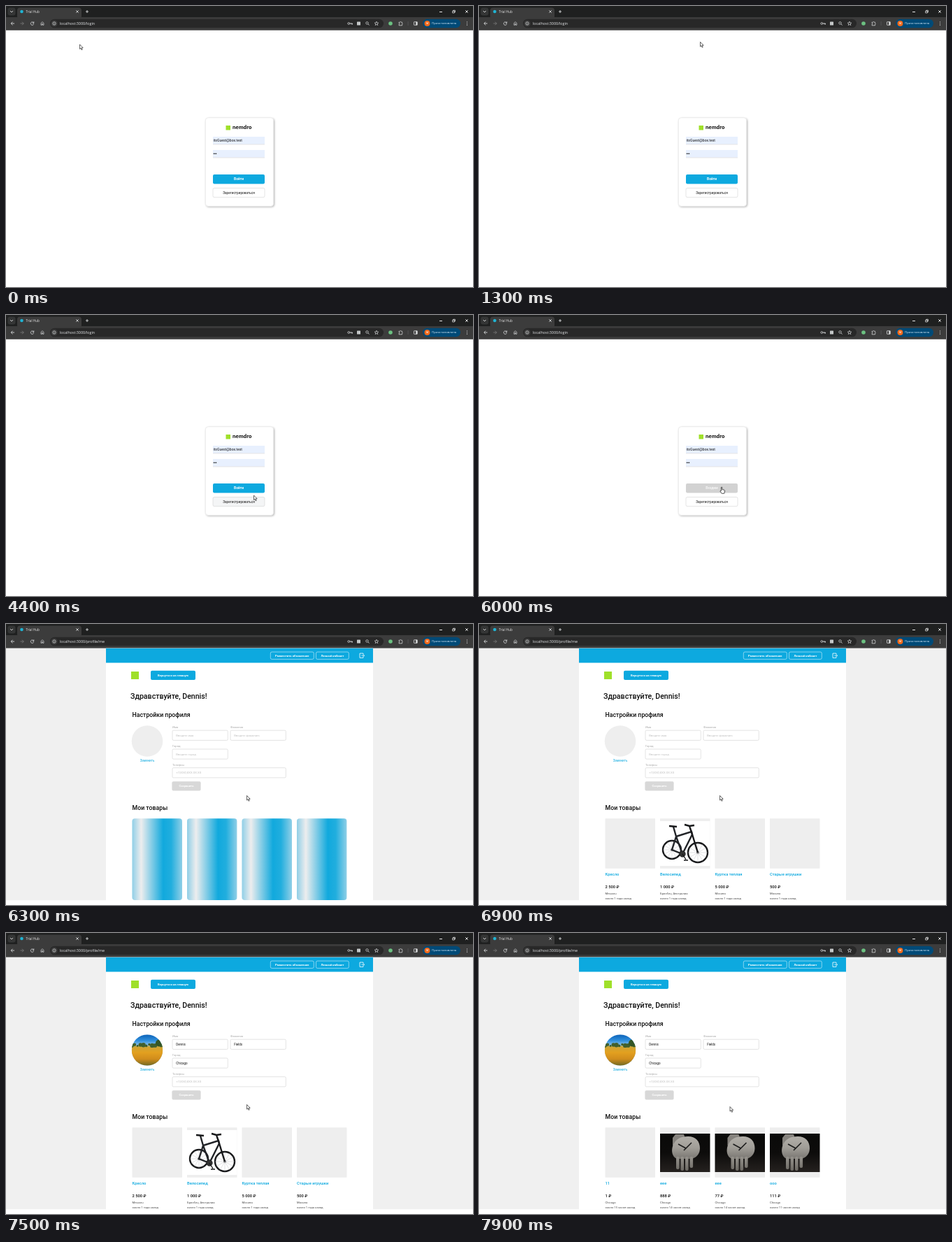
An HTML page with a canvas for the animation above (8000 ms loop, 668 px wide and 402 px high).

```html
<!DOCTYPE html>
<html lang="ru">
<head>
<meta charset="utf-8">
<style>
html, body { margin: 0; width: 100%; height: 100%; overflow: hidden; background: #fff; }
canvas { display: block; width: 668px; height: 402px; }
</style>
</head>
<body>
<canvas id="stage"></canvas>
<script>
const LOOP = 8000, W = 668, H = 402;
const BLUE = '#0da9df', GREY = '#eeeeee', MARK = '#9fe02a';
const ROBOTO = 'Roboto, sans-serif', SYSTEM = '"Open Sans", sans-serif';
const canvas = document.getElementById('stage');
const c = canvas.getContext('2d');
const dpr = window.devicePixelRatio || 1;
canvas.width = W * dpr;
canvas.height = H * dpr;

// Pointer path: time, x, y
const path = [
  [0, 105.5, 55], [100, 105.5, 55], [300, 177, 49.5], [500, 232.5, 57],
  [600, 232.5, 57], [900, 284, 64], [1100, 333, 56], [1200, 333, 56],
  [1300, 316.5, 51.5], [2000, 316.5, 51.5], [2400, 350, 90], [2800, 350, 90],
  [2900, 359, 62], [3300, 431, 143], [3500, 431, 143], [3800, 268.5, 106],
  [4000, 268.5, 106], [4400, 354.5, 258], [4500, 348, 254.5], [4600, 348, 254.5],
  [4700, 344.5, 245.5], [7700, 344.5, 245.5], [7900, 359, 248.5], [8000, 359, 248.5]
];

const market = [
  ['Кресло', '2 500 ₽', 'Мюнхен', '1 года'],
  ['Велосипед', '1 000 ₽', 'Брисбен, Австралия', '1 года', bike],
  ['Куртка теплая', '5 000 ₽', 'Москва', '1 года'],
  ['Старые игрушки', '500 ₽', 'Москва', '1 года']
];
const own = [
  ['11', '1 ₽', 'Chicago', '15 часов'],
  ['eee', '888 ₽', 'Chicago', '14 часов', hand],
  ['eee', '77 ₽', 'Chicago', '14 часов', hand],
  ['ooo', '111 ₽', 'Chicago', '11 часов', hand]
];

function rect(x, y, w, h, fill, r = 0, stroke, lw = 0.5) {
  c.beginPath();
  c.roundRect(x, y, w, h, r);
  if (fill) { c.fillStyle = fill; c.fill(); }
  if (stroke) { c.strokeStyle = stroke; c.lineWidth = lw; c.stroke(); }
}

function disc(x, y, r, fill, stroke, lw = 0.8) {
  c.beginPath();
  c.arc(x, y, r, 0, 7);
  if (fill) { c.fillStyle = fill; c.fill(); }
  if (stroke) { c.strokeStyle = stroke; c.lineWidth = lw; c.stroke(); }
}

function shape(d, x, y, fill, stroke, lw = 0.9) {
  const p = new Path2D(d);
  c.save();
  c.translate(x, y);
  if (fill) { c.fillStyle = fill; c.fill(p); }
  if (stroke) { c.strokeStyle = stroke; c.lineWidth = lw; c.stroke(p); }
  c.restore();
}

function fade(y0, y1, ...colors) {
  const g = c.createLinearGradient(0, y0, 0, y1);
  colors.forEach((color, i) => g.addColorStop(i / (colors.length - 1), color));
  return g;
}

function text(s, x, y, size, color, { align = 'left', weight = 400, font = ROBOTO } = {}) {
  c.font = `${weight} ${size}px ${font}`;
  c.textAlign = align;
  c.textBaseline = 'middle';
  c.fillStyle = color;
  c.fillText(s, x, y);
}

function button(label, x, y, w, h, fill, color, { border, size = 4.2, weight = 600 } = {}) {
  rect(x, y, w, h, fill, 2, border);
  text(label, x + w / 2, y + h / 2 + 0.2, size, color, { align: 'center', weight });
}

function browser(url) {
  const ink = '#d5d7d8';
  rect(0, 0, W, 16, '#1f2020');
  rect(2.5, 2.5, 11, 11, '#353636', 3);
  shape('M-2 -1L0 1L2 -1', 8, 8, null, ink);
  rect(16, 2.5, 92, 16, '#3c3c3c', 4);
  disc(22.5, 8, 2.3, '#20b4d4');
  text('Trial Hub', 28.5, 8.3, 4.6, '#e8e8e8', { font: SYSTEM });
  const cross = 'M-1.7 -1.7L1.7 1.7M1.7 -1.7L-1.7 1.7';
  shape(cross, 102, 8, null, ink);
  shape('M-2 0H2M0 -2V2', 116, 8, null, ink);
  shape('M-2 0H2', 622, 8.5, null, '#fff');
  shape('M-1.8 -.7H.9V1.9H-1.8ZM-.8 -.8V-1.8H1.9V.9H1', 640.5, 8, null, '#fff', 0.7);
  shape(cross, 659, 8, null, '#fff');

  rect(0, 16, W, 18.8, '#3c3c3c');
  rect(63, 18.7, 477, 12.6, '#282828', 6.3);
  shape('M2.5 0H-2.3M0 -2.3L-2.3 0L0 2.3', 9.5, 25, null, ink);
  shape('M-2.5 0H2.3M0 -2.3L2.3 0L0 2.3', 23, 25, null, '#777');
  shape('M1.8 -1.2A2.2 2.2 0 1 0 2.2 .5M2.3 -2.6V-.7H.4', 37.5, 25, null, ink);
  shape('M-2 -.6V2.3H-.6V.5H.6V2.3H2V-.6L0 -2.3Z', 52, 25, null, ink, 0.7);
  disc(69, 25, 4.6, '#3c3c3c');
  disc(69, 25, 2.2, null, ink, 0.7);
  shape('M0 -.3V1.3M0 -1.3V-.8', 69, 25, null, ink, 0.7);
  text(url, 77, 25.2, 5.35, '#e8eaed', { font: SYSTEM });
  disc(490.3, 25, 1.4, null, ink);
  shape('M1.4 0H5.2V1.5M3.8 0V1.4', 490.3, 25, null, ink);
  rect(502, 22.5, 5, 5, '#c4c7c8', 0.6);
  disc(516.5, 24.4, 1.7, null, ink);
  shape('M1.3 1.3L3.1 3.1', 516.5, 24.4, null, ink);
  shape('M0 -2.8L.8 -.9L2.8 -.8L1.2 .5L1.8 2.5L0 1.4L-1.8 2.5L-1.2 .5L-2.8 -.8L-.8 -.9Z', 530, 25, null, ink, 0.7);
  disc(550, 25, 2.8, '#6cc282');
  shape('M-2.4 -1.8H-.8A.9 .9 0 0 1 .9 -1.8H2.1V-.3A.9 .9 0 0 1 2.1 1.4V2.8H-2.4V1.2A.8 .8 0 0 0 -2.4 -.4Z', 564.5, 25, null, ink, 0.8);
  rect(574.8, 22, 0.5, 6, '#66696b');
  rect(583.5, 22.7, 4.8, 4.6, null, 0.4, ink, 0.8);
  rect(586.2, 22.7, 2.1, 4.6, ink);
  rect(596, 18.8, 54, 12.4, '#004a77', 6.2);
  disc(602.5, 25, 4, '#f2691b');
  text('М', 602.5, 25.2, 3.6, '#fff', { align: 'center' });
  text('Приостановлена', 609, 25.2, 4.3, '#d7ebfb', { font: SYSTEM });
  for (const y of [22.8, 25, 27.2]) disc(659.5, y, 0.6, ink);
}

function login(t) {
  c.save();
  c.shadowColor = 'rgba(0,0,0,.32)';
  c.shadowBlur = 3 * dpr;
  c.shadowOffsetX = c.shadowOffsetY = 1.2 * dpr;
  rect(285.3, 159.8, 97.4, 126.6, '#fff', 4);
  c.restore();
  rect(285.3, 159.8, 97.4, 126.6, '#fff', 4, '#d8d8d8');
  rect(314.5, 171, 6.5, 6.5, MARK);
  text('nemdro', 324, 174, 7.3, '#111', { weight: 700, font: 'Inter, sans-serif' });
  for (const y of [187, 206]) {
    rect(296, y, 74, 10.8, '#e8f0fe');
    rect(296, y + 10.8, 74, 0.5, '#c9c9cc');
  }
  text('itsGuest@box.test', 296.4, 192.7, 5.1, '#111');
  for (let i = 0; i < 3; i++) disc(297.4 + i * 1.6, 211.3, 0.7, '#111');

  const busy = t >= 4900;
  const fill = busy ? (t < 5000 ? '#a3c8d5' : '#d2d2d2') : BLUE;
  button(busy ? 'Входим' : 'Войти', 296, 241, 74, 13.6, fill, busy ? '#f4f4f4' : '#fff', { size: 4.9 });
  button('Зарегистрироваться', 296, 260.5, 74, 13.2, t === 4400 ? '#f4f5f6' : '#fff', '#111',
    { border: '#c8c8c8', size: 4.7, weight: 400 });
}

function field(label, hint, value, x, y, w) {
  text(label, x, y - 4.2, 4.2, '#a8a8a8');
  rect(x, y, w, 14.2, '#fff', 1.6, '#c6c6c6', 0.5);
  text(value || hint, x + 5.2, y + 7.3, value ? 4.5 : 4.2, value ? '#111' : '#c0c0c0');
}

function avatar(x, y, r) {
  c.save();
  c.beginPath();
  c.arc(x, y, r, 0, 7);
  c.clip();
  rect(x - r, y - r, 2 * r, 2 * r, fade(y - r, y - 5, '#0c62b8', '#2f8fdc', '#a4d0ee'));
  rect(x - r, y - 6, 2 * r, r + 6, fade(y - 6, y + r, '#c9a63a', '#e3a01f', '#d08c1c', '#6f6a24'));
  for (let i = 0; i < 12; i++) disc(x - r + i * 4.2, y - 7 - Math.sin(i * 2.3), 2.4 + Math.cos(i * 1.7), '#41602d');
  disc(x + 17, y - 10, 5, '#345626');
  c.restore();
}

function bike(x) {
  const black = '#17181a';
  rect(x, 282, 71.5, 64, '#fff');
  for (const [wx, wy, r] of [[x + 17, 323, 13], [x + 54, 327, 14]]) {
    disc(wx, wy, r, null, black, 2.4);
    disc(wx, wy, 1.8, '#333');
    c.beginPath();
    for (let i = 0; i < 12; i++) {
      const a = i * Math.PI / 6;
      c.moveTo(wx, wy);
      c.lineTo(wx + r * Math.cos(a), wy + r * Math.sin(a));
    }
    c.strokeStyle = '#b4b4b8';
    c.lineWidth = 0.4;
    c.stroke();
  }
  shape('M17 323L23 304L32 329ZM23 304L45 297L46 301L32 329M19 290L23 304', x, 0, null, '#222428', 2.4);
  shape('M42 289L46 301L54 327M35 287L42 289L49 288', x, 0, null, black, 2.4);
  shape('M13 289L24 290', x, 0, null, black, 2.6);
  disc(x + 32, 329, 4.2, '#333', black);
  shape('M32 329L37 337M34 338H40', x, 0, null, black, 1.4);
}

function hand(x) {
  rect(x, 287, 71.5, 55, fade(287, 342, '#0a0a09', '#0d0c0b', '#25211f'));
  shape('M18 293L22 288H34L36 294L26 304H18Z', x, 0, '#85827d');
  shape('M18 305C22 294 30 291 40 291C51 291 57 298 57 308C57 316 52 321 46 323H24C17 320 16 312 18 305Z',
    x, 0, fade(290, 324, '#b3b0aa', '#a19e98', '#77746f'));
  const skin = fade(320, 342, '#96938d', '#68655f');
  for (const [left, len] of [[23, 18], [29.5, 20], [36, 20], [42.5, 16]]) rect(x + left, 320, 4.6, len, skin, 2);
  shape('M26 302L37 308L45 300M37 308L34 311', x, 0, null, '#1c1c1c', 1.6);
}

function skeleton(x, phase) {
  c.save();
  c.beginPath();
  c.roundRect(x, 278.2, 71.5, 116.8, 4);
  c.clip();
  const start = x + (phase % 1) * 71.5;
  for (const left of [start - 71.5, start]) {
    const g = c.createLinearGradient(left, 0, left + 71.5, 0);
    g.addColorStop(0, '#90cfe7');
    g.addColorStop(0.18, '#ededee');
    g.addColorStop(0.62, '#11a9dd');
    g.addColorStop(0.78, '#21aede');
    g.addColorStop(1, '#90cfe7');
    rect(left, 278, 71.8, 117.2, g);
  }
  c.restore();
}

function card(x, [title, price, place, age, photo]) {
  rect(x, 278.2, 71.5, 71.5, GREY);
  if (photo) photo(x);
  text(title, x, 358.3, 5.8, BLUE, { weight: 500 });
  text(price, x, 376, 5.8, '#111', { weight: 500 });
  text(place, x, 385.6, 4.2, '#4f4f4f');
  text(`около ${age} назад`, x, 392.3, 4.2, '#4f4f4f');
}

function profile(t) {
  rect(0, 34.8, W, 360.6, '#f0f0f0');
  rect(143, 34.8, 382, 360.6, '#fff');
  rect(143, 34.8, 382, 20.8, BLUE);
  button('Разместить объявление', 378.3, 40, 62, 10.4, null, '#fff', { border: '#fff' });
  button('Личный кабинет', 443.5, 40, 46.8, 10.4, null, '#fff', { border: '#fff' });
  shape('M2 -1.5V-3.2H-3V3.2H2V1.5M-.5 0H3.6M2.2 -1.4L3.6 0L2.2 1.4', 509, 45.2, null, '#fff', 0.8);
  rect(179, 68, 11, 11, MARK);
  button('Вернуться на главную', 207, 66.7, 64, 13.4, BLUE, '#fff');
  text('Здравствуйте, Dennis!', 178, 104.2, 10.6, '#111', { weight: 500 });
  text('Настройки профиля', 180.5, 130.4, 8.75, '#111', { weight: 500 });

  const filled = t >= 7200;
  if (filled) avatar(202, 167.5, 22.3);
  else disc(202, 167.5, 22.3, GREY);
  text('Заменить', 202, 195.7, 4.5, BLUE, { align: 'center' });
  field('Имя', 'Введите имя', filled && 'Dennis', 238, 152.2, 79.3);
  field('Фамилия', 'Введите фамилию', filled && 'Fields', 321, 152.2, 79.3);
  field('Город', 'Введите город', filled && 'Chicago', 238, 179, 79.3);
  field('Телефон', '+7(XXX)XXX.XX.XX', '', 238, 205.7, 162.3);
  button('Сохранить', 237.4, 225.3, 41.2, 13.2, '#d8d8d8', '#fff');
  text('Мои товары', 180.5, 263.8, 8.75, '#111', { weight: 500 });

  const cards = t >= 7800 ? own : market;
  cards.forEach((item, i) => {
    const x = 180.5 + i * 78.5;
    if (t < 6900) skeleton(x, (t - 6300) / 1600);
    else card(x, item);
  });
  rect(0, 395.4, W, 7, '#fff');
}

function pointer(t) {
  const i = path.findIndex((p, n) => n && p[0] >= t);
  const [t0, x0, y0] = path[i - 1], [t1, x1, y1] = path[i];
  const k = (t - t0) / (t1 - t0);
  const x = x0 + (x1 - x0) * k, y = y0 + (y1 - y0) * k;
  if (t >= 4700 && t < 6300) {
    shape('M1.6 .8Q2.3 .2 3 .8V4L6 4.6Q7 5 6.8 6.2L6 9.6H2.4L.1 6.4Q.2 5.3 1.6 6Z', x + 0.3, y + 0.2, '#fff', '#111', 0.7);
  } else {
    shape('M0 0V6.6L1.5 5.2L2.6 7.8L3.7 7.3L2.6 4.8H4.7Z', x, y, '#fff', '#111', 0.65);
  }
}

function draw(now) {
  const t = Math.floor((now % LOOP) / 100) * 100;
  c.setTransform(dpr, 0, 0, dpr, 0, 0);
  rect(0, 0, W, H, '#fff');
  const signedIn = t >= 6300;
  browser(signedIn ? 'localhost:3000/profile/me' : 'localhost:3000/login');
  if (signedIn) profile(t);
  else login(t);
  pointer(t);
}

const begin = performance.now();
function tick() {
  draw(performance.now() - begin);
  requestAnimationFrame(tick);
}
tick();
</script>
</body>
</html>
```
